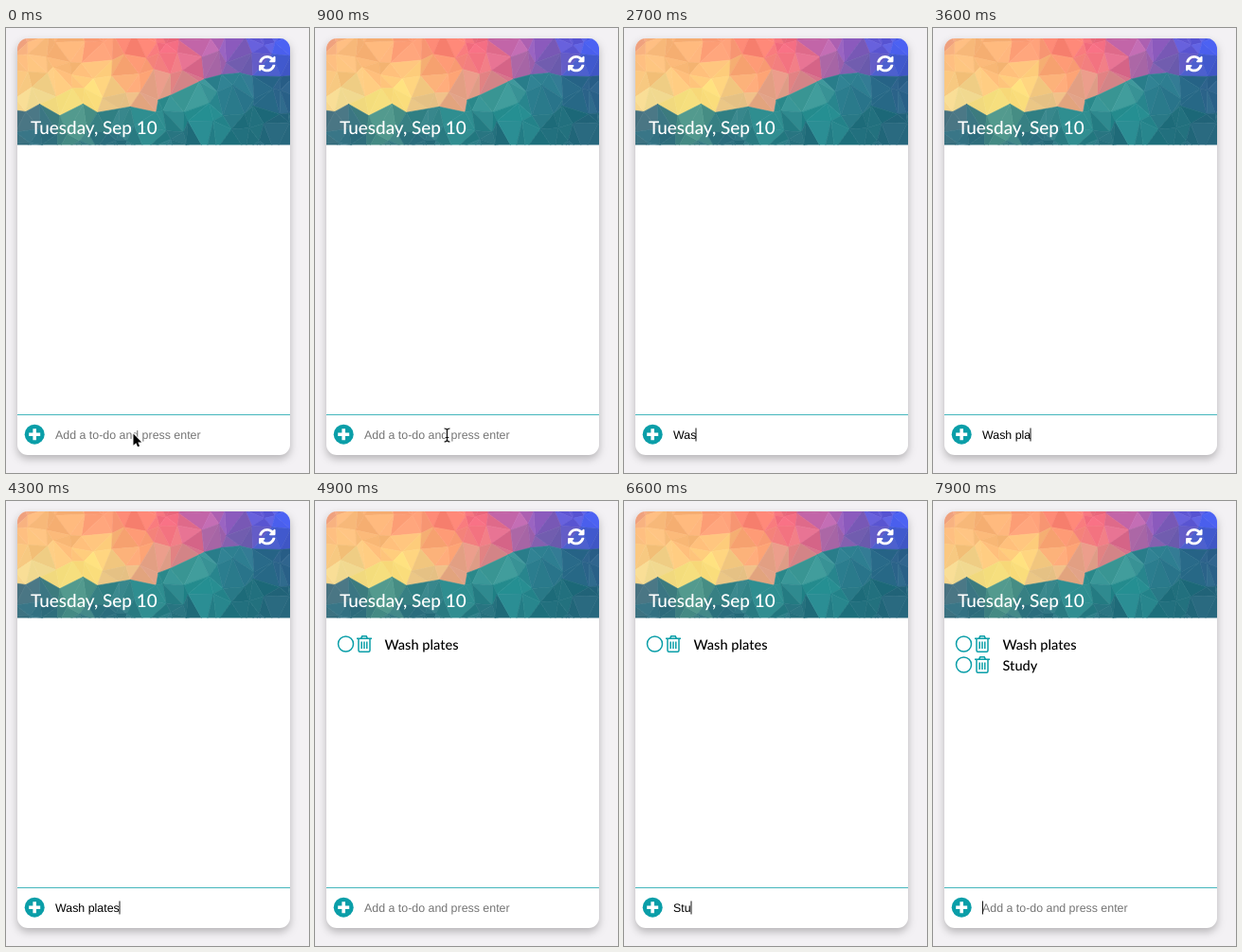
Recreate the animation shown at these times as an HTML page. Size 320 by 470 pixels, loop 8000 ms.

```html
<!DOCTYPE html>
<html lang="en">
<head>
<meta charset="utf-8">
<title>To-do list</title>
<style>
  html, body { margin: 0; width: 100%; height: 100%; overflow: hidden; background: #f3f1f4; }
  svg { display: block; width: 320px; height: 470px; text-rendering: geometricPrecision; }
  .card { fill: #fff; filter: drop-shadow(0 4px 4px rgba(0, 0, 0, .25)); }
  .title { font: 500 18.9px Lato, sans-serif; fill: #fff; }
  .item { font: 500 14.6px Lato, sans-serif; }
  .icons { fill: none; stroke: #0a9ea8; stroke-width: 1.5; }
  .input { font: 12.4px "Liberation Sans", Arial, sans-serif; white-space: pre; }
  .beam { fill: none; stroke: #111; stroke-width: 1.2; }
  .halo { stroke: #fff; stroke-width: 2.6; }
</style>
</head>
<body>
<svg viewBox="0 0 320 470">
  <defs>
    <clipPath id="headClip"><path d="M12 123.4V22a11 11 0 0 1 11-11h266a11 11 0 0 1 11 11v101.4z"/></clipPath>
    <path id="half" d="M370.7 133.3C339.5 104 298.9 88 255.8 88c-77.4 0-144.3 53.2-162.7 126.9-1.4 5.3-6.2 9.1-11.7 9.1H24.1c-7.5 0-13.2-6.8-11.8-14.2C33.9 94.9 134.8 8 256 8c66.4 0 126.8 26.1 171.3 68.7L463 41c15.1-15.1 41-4.4 41 17V192c0 13.3-10.7 24-24 24H345.9c-21.3 0-32-25.9-16.9-41z"/>
    <path id="stem" d="M-3-7q3 0 3 2.2V4.8Q0 7-3 7M3-7q-3 0-3 2.2V4.8Q0 7 3 7M-1.8 2.5h3.6"/>
    <g id="icons">
      <circle cx="32.5" cy="0" r="8"/>
      <path d="M44-5.7h16M48.4-5.7l1.4-2.5h4.4l1.4 2.5M46-5.7V6.7q0 1.5 1.5 1.5h9q1.5 0 1.5-1.5V-5.7M49.2-2.6V5M52-2.6V5M54.8-2.6V5"/>
    </g>
  </defs>

  <rect class="card" x="12" y="11" width="288" height="440" rx="11"/>
  <g clip-path="url(#headClip)" id="mesh"></g>
  <g transform="translate(266.8 28.6) scale(.0352)" fill="#fff">
    <use href="#half"/>
    <use href="#half" transform="rotate(180 256 256)"/>
  </g>
  <text class="title" x="26" y="112">Tuesday, Sep 10</text>

  <g class="item" id="first" transform="translate(0 151)"><use class="icons" href="#icons"/><text x="73.5" y="6.3">Wash plates</text></g>
  <g class="item" id="second" transform="translate(0 173)"><use class="icons" href="#icons"/><text x="73.5" y="6.3">Study</text></g>

  <path d="M12 408.5h288" stroke="#45b6bc"/>
  <circle cx="30.2" cy="429.2" r="10.5" fill="#0a9ea8"/>
  <path d="M24.2 429.2h12M30.2 423.2v12" stroke="#fff" stroke-width="3.6"/>
  <text class="input" id="field" x="52" y="434"></text>
  <path id="caret" d="M.5 422.5v14" stroke="#111"/>
  <path id="arrow" d="M0 0v12.3l2.8-2.6 1.8 4.1 2-.9-1.8-4h3.9z" stroke="#fff" stroke-width="1.4" paint-order="stroke"/>
  <g class="beam" id="beam"><use class="halo" href="#stem"/><use href="#stem"/></g>
</svg>
<script>
const $ = id => document.getElementById(id);
const show = (id, on) => $(id).setAttribute('visibility', on ? 'visible' : 'hidden');
const move = (id, x, y) => $(id).setAttribute('transform', `translate(${x} ${y})`);

// Colour anchors of the faceted header: x, y, colour
const parse = list => list.split(',').map(s => {
  const [x, y, c] = s.trim().split(' ');
  return { x: +x, y: +y, rgb: [0, 2, 4].map(i => parseInt(c.substr(i, 2), 16)) };
});
const warm = parse(`14 14 f0a080,28 26 fbbd7c,62 20 fcb478,95 19 fd9c76,140 19 fd8474,173 24 f2697e,
  213 19 c568b0,235 24 8f5dc2,269 19 605ad8,294 24 4b62f4,290 42 4058c4,250 38 7060b0,
  28 52 f9c47c,72 50 fcba78,106 56 fbcb78,140 50 fda271,173 46 f27c7c,196 41 e16a8c,218 36 a868a8,
  33 72 f0da92,89 66 fae07a,61 80 f6e07e,117 76 e9c68a,162 66 e0a48a,188 58 d98f90`);
const cool = parse(`16 98 4a7280,30 116 2f6f80,75 100 4d9488,115 98 37868a,150 95 2a8a8c,
  195 72 3f9a98,205 96 238d90,240 62 2d7f90,268 68 2e6f8e,294 62 2a5f88,262 98 1f6d7a,
  294 112 24647a,110 120 296c7c,190 120 27707e`);

// Line between the warm and the cool facets
const ridge = [[-20, 84], [12, 86], [38, 93], [80, 92], [115, 86], [150, 80], [185, 67], [215, 51], [245, 47], [270, 53], [340, 47]];
function edge(x) {
  const i = Math.max(1, ridge.findIndex(p => p[0] >= x));
  const [[x0, y0], [x1, y1]] = [ridge[i - 1], ridge[i]];
  return y0 + (y1 - y0) * (x - x0) / (x1 - x0);
}

let seed = 11;
const rand = () => (seed = seed * 16807 % 2147483647) / 2147483647;

function shade(x, y) {
  let sum = 0;
  const mix = [0, 0, 0];
  for (const a of y < edge(x) ? warm : cool) {
    const w = 1 / (((x - a.x) ** 2 + (y - a.y) ** 2) ** 2 + 9000);
    sum += w;
    a.rgb.forEach((v, i) => mix[i] += v * w);
  }
  const light = (rand() - .5) * 16;
  return `rgb(${mix.map(v => Math.round(v / sum + light))})`;
}

function drawMesh() {
  const step = 19, rows = 8, cols = 18;
  const grid = Array.from({ length: rows + 1 }, (_, r) => Array.from({ length: cols + 1 }, (_, c) => {
    const x = (c - .8 + (r % 2) / 2 + (rand() - .5) * .8) * step + 6;
    const y = (r - .7 + (rand() - .5) * .8) * step + 5;
    return [x, Math.abs(y - edge(x)) < step / 2 ? edge(x) : y];
  }));
  let out = '';
  const facet = (...p) => {
    const [x, y] = [0, 1].map(i => (p[0][i] + p[1][i] + p[2][i]) / 3);
    const color = shade(x, y);
    out += `<path d="M${p.map(q => q.map(v => v.toFixed(1))).join('L')}z" fill="${color}" stroke="${color}" stroke-width=".6"/>`;
  };
  for (let r = 0; r < rows; r++) for (let c = 0; c < cols; c++) {
    const a = grid[r][c], b = grid[r][c + 1], d = grid[r + 1][c], e = grid[r + 1][c + 1];
    if (r % 2) { facet(a, b, e); facet(a, d, e); }
    else { facet(a, b, d); facet(b, d, e); }
  }
  $('mesh').innerHTML = out;
}

const LOOP = 8000, CLICK = 1200, KEY = 180;
const entries = [
  { text: 'Wash plates', start: 2300, enter: 4350 },
  { text: 'Study', start: 6220, enter: 7450 }
];

function draw(t) {
  let typed = '', last = CLICK;
  for (const e of entries) {
    if (t < e.start) continue;
    const n = Math.min(e.text.length, Math.floor((t - e.start) / KEY) + 1);
    typed = t < e.enter ? e.text.slice(0, n) : '';
    last = t < e.enter ? e.start + (n - 1) * KEY : e.enter;
  }
  $('field').textContent = typed || 'Add a to-do and press enter';
  $('field').setAttribute('fill', typed ? '#000' : '#757575');
  move('caret', 52 + (typed ? Math.round($('field').getComputedTextLength()) - .5 : 0), 0);
  show('caret', t >= CLICK && (t - last) % 1000 < 500);
  show('first', t >= entries[0].enter);
  show('second', t >= entries[1].enter);

  const k = Math.min(1, t / 500), ease = k * k * (3 - 2 * k);
  move('arrow', 134.5 + 4 * ease, 428.5 + ease);
  move('beam', 139.5, 430);
  show('arrow', t < 500);
  show('beam', t >= 500 && t < entries[0].start);
}

drawMesh();
const begin = performance.now();
function tick() {
  draw(Math.floor((performance.now() - begin) % LOOP / 100) * 100);
  requestAnimationFrame(tick);
}
tick();
</script>
</body>
</html>
```
